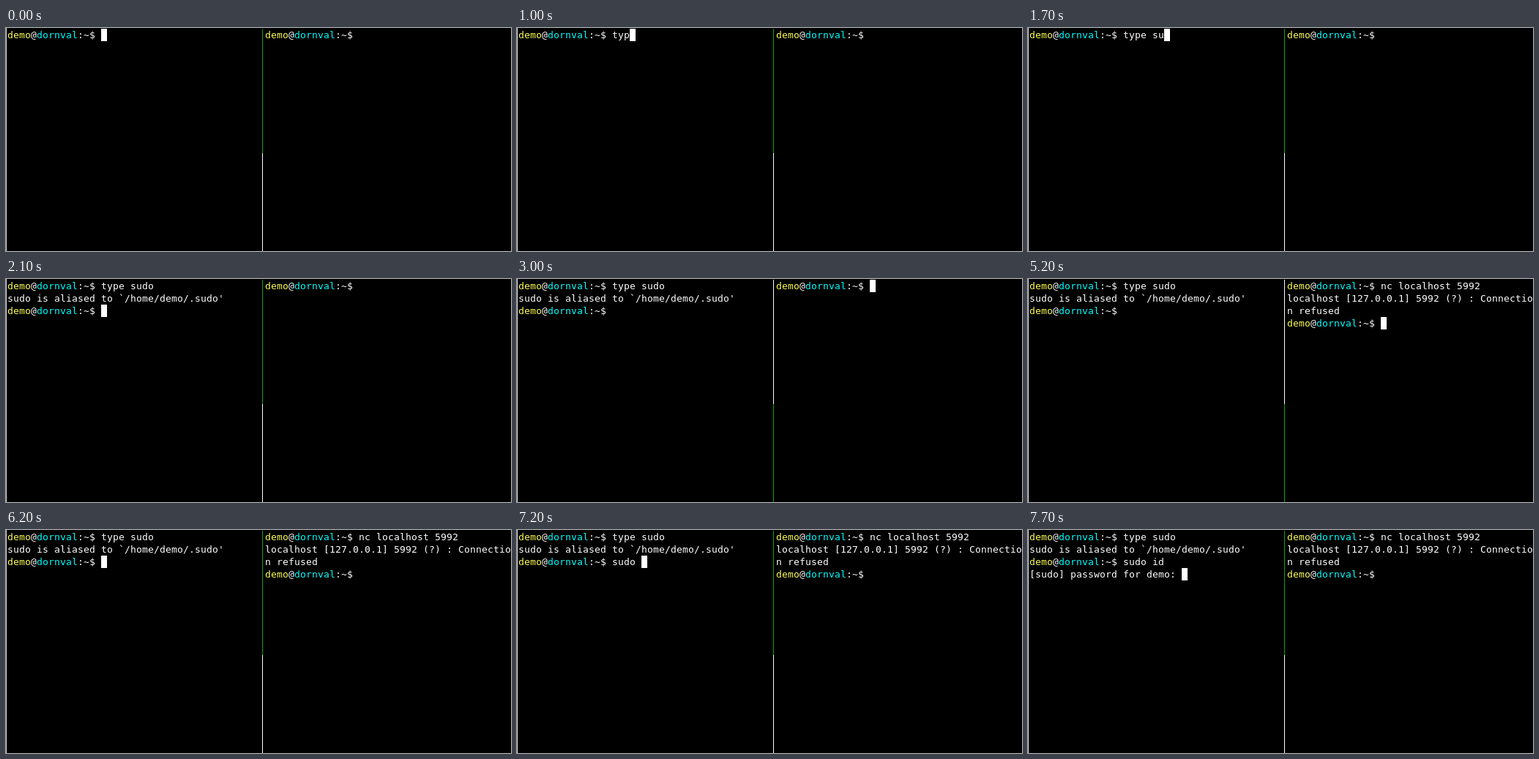
Recreate the animation shown at these times as an HTML page with a canvas. Size 690x305 px, loop 8 s.

```html
<!DOCTYPE html>
<html lang="en">
<head>
<meta charset="utf-8">
<title>Split terminal</title>
<style>
  html, body { margin: 0; width: 100%; height: 100%; overflow: hidden; background: #000; }
  canvas { display: block; }
</style>
</head>
<body>
<canvas id="stage" width="690" height="305"></canvas>
<script>
const ctx = document.getElementById('stage').getContext('2d');
const LOOP = 8000, CELL = 8, ROW = 17, TOP = 1, BASELINE = 13;
const WHITE = '#fff', GREEN = '#00aa00', YELLOW = '#ffff55', CYAN = '#00ffff', EDGE = '#ccc';
const USER = 'demo', HOST = 'dornval';

const prompt = (command = '') =>
  [[USER, YELLOW], ['@', WHITE], [HOST, CYAN], [':~$ ' + command, WHITE]];
const plain = text => [[text, WHITE]];

// One entry per keystroke; equal times mean keys that appear together.
const typed = (text, times, t) => text.slice(0, times.filter(at => t >= at).length);

function leftLines(t) {
  const lines = [prompt(typed('type sudo', [400, 600, 1000, 1100, 1300, 1600, 1700, 1800, 1900], t))];
  if (t >= 2100) {
    lines.push(plain(`sudo is aliased to \`/home/${USER}/.sudo'`));
    lines.push(prompt(typed('sudo id', [6700, 6900, 6900, 7000, 7200, 7400, 7500], t)));
  }
  if (t >= 7700) lines.push(plain(`[sudo] password for ${USER}: `));
  return lines;
}

function rightLines(t) {
  const lines = [prompt(t >= 4100 ? 'nc localhost 5992' : '')];
  if (t >= 5200) {
    lines.push(plain('localhost [127.0.0.1] 5992 (?) : Connectio'));
    lines.push(plain('n refused'));
    lines.push(prompt());
  }
  return lines;
}

function rect(x, y, w, h, color) {
  ctx.fillStyle = color;
  ctx.fillRect(x, y, w, h);
}

function drawPane(left, lines, active) {
  let x, y;
  lines.forEach((line, row) => {
    x = left;
    y = TOP + row * ROW;
    for (const [text, color] of line) {
      ctx.fillStyle = color;
      for (const char of text) {
        ctx.fillText(char, x, y + BASELINE);
        x += CELL;
      }
    }
  });
  if (active) rect(x, y, CELL, ROW, WHITE);
}

function draw(t) {
  const rightActive = t >= 3000 && t < 6200;
  rect(0, 0, 690, 305, '#000');
  rect(0, 0, 1, 305, EDGE);
  rect(350, TOP, 1, 170, rightActive ? WHITE : GREEN);
  rect(350, TOP + 170, 1, 134, rightActive ? GREEN : WHITE);
  ctx.font = '13px "DejaVu Sans Mono", monospace';
  drawPane(2, leftLines(t), !rightActive);
  drawPane(354, rightLines(t), rightActive);
}

const start = performance.now();
function tick() {
  draw((performance.now() - start) % LOOP);
  requestAnimationFrame(tick);
}
tick();
</script>
</body>
</html>
```
